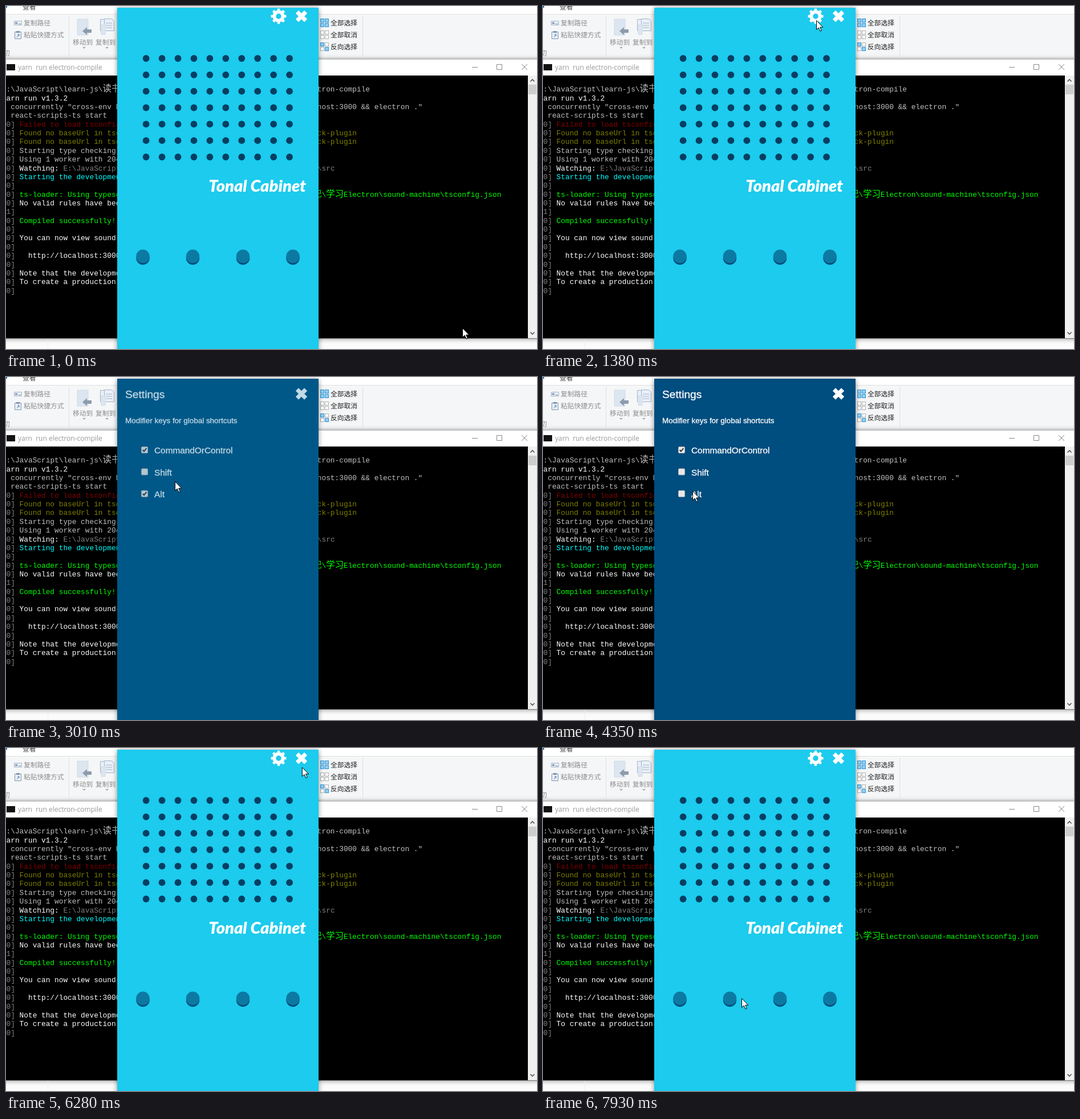
An HTML page for the animation above (7990 ms loop, 931x602 px).

```html
<!DOCTYPE html>
<html lang="zh">
<head>
<meta charset="utf-8">
<title>Sound panel demo</title>
<style>
html, body { margin: 0; width: 100%; height: 100%; overflow: hidden; background: #fbfbfb; }
svg { display: block; width: 931px; height: 602px; }
text { white-space: pre; }
.ui { font: 11.75px "Noto Sans CJK SC", "Noto Sans CJK", sans-serif; }
.caption { font: 12px "Open Sans", sans-serif; }
.term { font: 12.8px "Liberation Mono", monospace; }
.term .cjk { font: 15.36px "Noto Sans CJK SC", "Noto Sans CJK", sans-serif; }
.brand { font: italic 900 29px Lato, sans-serif; }
#settings text { font-family: "Liberation Sans", sans-serif; stroke-width: .3px; }
.cross { stroke-width: 7.2px; fill: none; }
</style>
</head>
<body>
<svg viewBox="0 0 931 602">
  <defs>
    <filter id="shade" x="-10%" y="-10%" width="120%" height="120%">
      <feDropShadow dx="0" dy="1" stdDeviation="4" flood-opacity=".45"/>
    </filter>
    <path id="cross" d="M-7.600-7.600 7.600 7.600M7.600-7.600-7.600 7.600"/>
  </defs>

  <!-- file manager ribbon -->
  <rect width="931" height="15" fill="#fff"/>
  <rect y="15" width="931" height="77" fill="#f5f6f7"/>
  <path d="M0 14.500H931M110.500 17V88M625.500 17V88M0 91.500H931" stroke="#dfe0e2"/>
  <rect width="2" height="3" fill="#1979ca"/>
  <g class="ui" fill="#8c8c8c">
    <text x="29" y="6" fill="#444">查看</text>
    <text x="31" y="34">复制路径</text>
    <text x="31" y="55">粘贴快捷方式</text>
    <text x="117" y="68">移动到</text>
    <text x="157" y="68">复制到</text>
    <text x="-5" y="87">切</text>
    <path d="M134 72h6l-3 3zM174 72h6l-3 3z" fill="#aaa"/>
    <g fill="#222">
      <text x="569" y="34">全部选择</text>
      <text x="569" y="55">全部取消</text>
      <text x="569" y="76">反向选择</text>
    </g>
  </g>
  <g fill="#e9f0f8" stroke="#a3b4c8">
    <path d="M14.500 26.500h13v7h-13z"/>
    <path d="M16 31.500l1-3 1 3 1-3 1 3M22 31.500h4" fill="none" stroke="#6f87a5"/>
    <path d="M15.500 45.500h11v12h-11z" stroke="#7f93b0"/>
    <path d="M18 44h6v3h-6z" fill="#7f93b0" stroke="none"/>
    <path d="M19 55l4-5M20 50h3v3" stroke="#4f78ad" fill="none"/>
    <path d="M125 23h19v28h-19z" fill="#dce6f1" stroke="#d0dbe8"/>
    <path d="M134 44l8-7v4h8v6h-8v4z" fill="#8d9bac" stroke="none"/>
    <path d="M165.500 23.500h14v20h-14z"/>
    <path d="M172.500 22.500h13l4 4v17h-17z"/>
    <path d="M175 30h11M175 34h11M175 38h11"/>
    <path d="M167 33h7v17h-7z" fill="#dce6f1" stroke="#d0dbe8"/>
  </g>
  <g id="tiles"></g>

  <!-- terminal window -->
  <g filter="url(#shade)"><rect x="-20" y="93" width="971" height="490" fill="#fff"/></g>
  <path d="M0 93.500H931" stroke="#b5b5b5"/>
  <rect x="1" y="102" width="15" height="11" fill="#111"/>
  <text class="caption" x="21" y="111.500" fill="#999">yarn  run electron-compile</text>
  <path d="M817 107.500h10M860.500 102.500h9v9h-9zM904 102l10 10M914 102l-10 10" fill="none" stroke="#888"/>
  <rect y="122" width="915" height="461" fill="#000"/>
  <rect x="915" y="122" width="16" height="461" fill="#f0f0f0"/>
  <rect x="916" y="138" width="14" height="17" fill="#cdcdcd"/>
  <path d="M919.500 132.500l3.500-3.500 3.500 3.500M919.500 572.500l3.500 3.500 3.500-3.500" fill="none" stroke="#555" stroke-width="1.600"/>
  <path d="M0 583.500H931" stroke="#777"/>
  <path d="M73.500 585V602" stroke="#eee"/>
  <g id="term" class="term"></g>

  <!-- app window -->
  <g filter="url(#shade)"><rect id="panel" x="195" y="3" width="353" height="620"/></g>
  <g id="home">
    <g transform="translate(478 18)" fill="none" stroke="#fff">
      <circle r="7.700" stroke-width="6"/>
      <circle r="11.200" stroke-width="4.600" pathLength="16" stroke-dasharray=".95 1.050" stroke-dashoffset=".475"/>
    </g>
    <use href="#cross" class="cross" x="518" y="18" stroke="#fff"/>
    <g id="dots" fill="#063f63"></g>
    <text class="brand" x="526" y="326" text-anchor="end" fill="#fff">Tonal Cabinet</text>
    <g id="buttons"></g>
  </g>
  <g id="settings">
    <g id="labels">
      <text x="209" y="36.500" font-size="19.200">Settings</text>
      <text x="209" y="81.300" font-size="13.440">Modifier keys for global shortcuts</text>
      <use href="#cross" class="cross" x="518" y="29.500"/>
    </g>
  </g>

  <g id="cursor" stroke="#000" fill="#fff" stroke-linejoin="round">
    <path id="arrow" d="M.5.5V16.500L4.200 13 7 19.200 9.400 18.200 6.700 12.200H11.800Z"/>
    <path id="hand" d="M-1.500 2Q0 0 1.500 2V7.500Q3.500 6 4.500 8 6.500 7 7.200 9 9.500 8.500 9.500 11V14.500Q9.500 16.500 8 18.500V21H-1V19L-5 13Q-5.500 10.500-3.500 11L-1.500 13ZM1.500 7.500V11.500M4.500 8.500V11.500M7.200 9.500V12"/>
  </g>
</svg>

<script>
const $ = id => document.getElementById(id);

function add(parent, tag, attrs, text) {
  const el = document.createElementNS('http://www.w3.org/2000/svg', tag);
  for (const key in attrs) el.setAttribute(key, attrs[key]);
  if (text) el.textContent = text;
  parent.append(el);
  return el;
}

// Selection icons: a bit per tile tells whether it is filled
[15, 0, 9].forEach((mask, row) => {
  for (let i = 0; i < 4; i++) {
    const on = mask >> i & 1;
    add($('tiles'), 'rect', {
      x: 551.5 + i % 2 * 8, y: 22.5 + row * 21 + (i >> 1) * 8, width: 6, height: 6,
      fill: on ? '#8fd0f5' : '#fff', stroke: on ? '#3093d0' : '#b0b0b0'
    });
  }
});

// Terminal: half-width cells, CJK characters take two
const CELL = 7.68, ROW = 15.36;
function print(row, col, text, fill) {
  for (const part of text.match(/[\u4e00-\u9fff]+|[^\u4e00-\u9fff]+/g)) {
    const cjk = part[0] > '\u4dff';
    add($('term'), 'text', {
      x: col * CELL - 7.1, y: 150.3 + row * ROW, fill, class: cjk ? 'cjk' : ''
    }, part);
    col += part.length * (cjk ? 2 : 1);
  }
}
const GRAY = '#808080', SILVER = '#c0c0c0', WHITE = '#fff', LIME = '#0f0', OLIVE = '#808000';
const project = 'E:\\JavaScript\\learn-js\\读书笔记\\学习Electron\\sound-machine';
const noBase = 'Found no baseUrl in tsconfig.json, not applying tsconfig-paths-webpack-plugin';
[
  project + '>yarn run electron-compile',
  'yarn run v1.3.2',
  '$ concurrently "cross-env BROWSER=none yarn start" "wait-on http://localhost:3000 && electron ."',
  '$ react-scripts-ts start'
].forEach((line, i) => print(i, 0, line, i === 1 ? WHITE : SILVER));
[
  ['Failed to load tsconfig.json', '#800000'],
  [noBase, OLIVE],
  [noBase, OLIVE],
  ['Starting type checking and linting service...', SILVER],
  ['Using 1 worker with 2048MB memory limit', SILVER],
  ['Watching:', WHITE],
  ['Starting the development server...', '#0ff'],
  [],
  ['ts-loader: Using typescript@2.6.2 and ' + project + '\\tsconfig.json', LIME],
  ['No valid rules have been specified for JavaScript files', WHITE],
  [],
  ['Compiled successfully!', LIME],
  [],
  ['You can now view sound-machine in the browser.', WHITE],
  [],
  ['  http://localhost:3000/', WHITE],
  [],
  ['Note that the development build is not optimized.', WHITE],
  ['To create a production build, use yarn build.', WHITE],
  []
].forEach(([line, fill], i) => {
  print(i + 4, 0, i === 10 ? '[1]' : '[0]', GRAY);
  if (line) print(i + 4, 4, line, fill);
});
print(9, 14, project + '\\src', GRAY);

// Speaker grille and push buttons
for (let i = 0; i < 70; i++) {
  add($('dots'), 'circle', { cx: 245.6 + i % 10 * 27.94, cy: 92 + Math.floor(i / 10) * 28.83, r: 5.9 });
}
for (const x of [240, 327.5, 415.5, 503]) {
  for (const [y, fill] of [[430.5, '#044e7f'], [427.5, '#0c79a2']]) {
    add($('buttons'), 'rect', { x: x - 11.7, y, width: 23.4, height: 23.7, rx: 11.7, fill });
  }
}

// Modifier check boxes
const boxes = ['CommandOrControl', 'Shift', 'Alt'].map((name, i) => {
  const y = 128 + i * 38.4;
  add($('labels'), 'text', { x: 260, y: y + 6.3, 'font-size': 15.36 }, name);
  const box = add($('settings'), 'g', { transform: `translate(243 ${y})` });
  add(box, 'rect', { x: -5.5, y: -5.5, width: 11, height: 11, rx: 1.5, fill: '#e8e8e8', stroke: '#b0b0b0' });
  return {
    box,
    tick: add(box, 'path', { d: 'M-3.200 0-1 2.500 3.300-3', fill: 'none', stroke: '#333', 'stroke-width': 2 })
  };
});

const LOOP = 7990, OPEN = 1990, CLOSE = 6280;
const path = [
  [0, 800, 565], [70, 800, 565], [830, 478, 35], [900, 479, 25], [2310, 479, 25],
  [3010, 296, 183], [3160, 290, 191], [3480, 240, 197], [4030, 262, 200], [4350, 262, 200],
  [4590, 270, 170], [5440, 270, 170], [5740, 519, 33], [6280, 519, 33], [6650, 446, 197],
  [7070, 424, 430], [7360, 418, 440], [7700, 418, 440], [7930, 348, 439], [LOOP, 348, 439]
];
const lerp = (a, b, p) => a + (b - a) * p;
const mix = (a, b, p) => `rgb(${a.map((v, i) => Math.round(lerp(v, b[i], p)))})`;
const show = (el, on) => el.setAttribute('visibility', on ? 'inherit' : 'hidden');

function cursorAt(t) {
  const i = path.findIndex(k => k[0] > t);
  const [t0, x0, y0] = path[i - 1], [t1, x1, y1] = path[i];
  const p = (t - t0) / (t1 - t0);
  return [lerp(x0, x1, p), lerp(y0, y1, p)];
}

function draw() {
  const t = performance.now() % LOOP;
  const open = t >= OPEN && t < CLOSE;
  const fade = Math.min(1, Math.max(0, (t - 1975) / 1380));

  show($('home'), !open);
  show($('settings'), open);
  $('panel').setAttribute('fill', open ? mix([12, 121, 162], [4, 78, 127], fade) : '#1ecbed');
  const ink = mix([10, 108, 150], [255, 255, 255], fade);
  $('labels').setAttribute('fill', ink);
  $('labels').setAttribute('stroke', ink);

  const checked = [true, t >= 4590 && t < 5280, t < 4190];
  boxes.forEach(({ box, tick }, i) => {
    box.setAttribute('opacity', 0.06 + 0.94 * fade);
    show(tick, checked[i]);
  });

  const [x, y] = cursorAt(t);
  const hand = t >= 900 && t < 1380 || t >= 5740 && t < CLOSE;
  $('cursor').setAttribute('transform', `translate(${x} ${y})`);
  show($('hand'), hand);
  show($('arrow'), !hand);
  requestAnimationFrame(draw);
}
draw();
</script>
</body>
</html>
```
